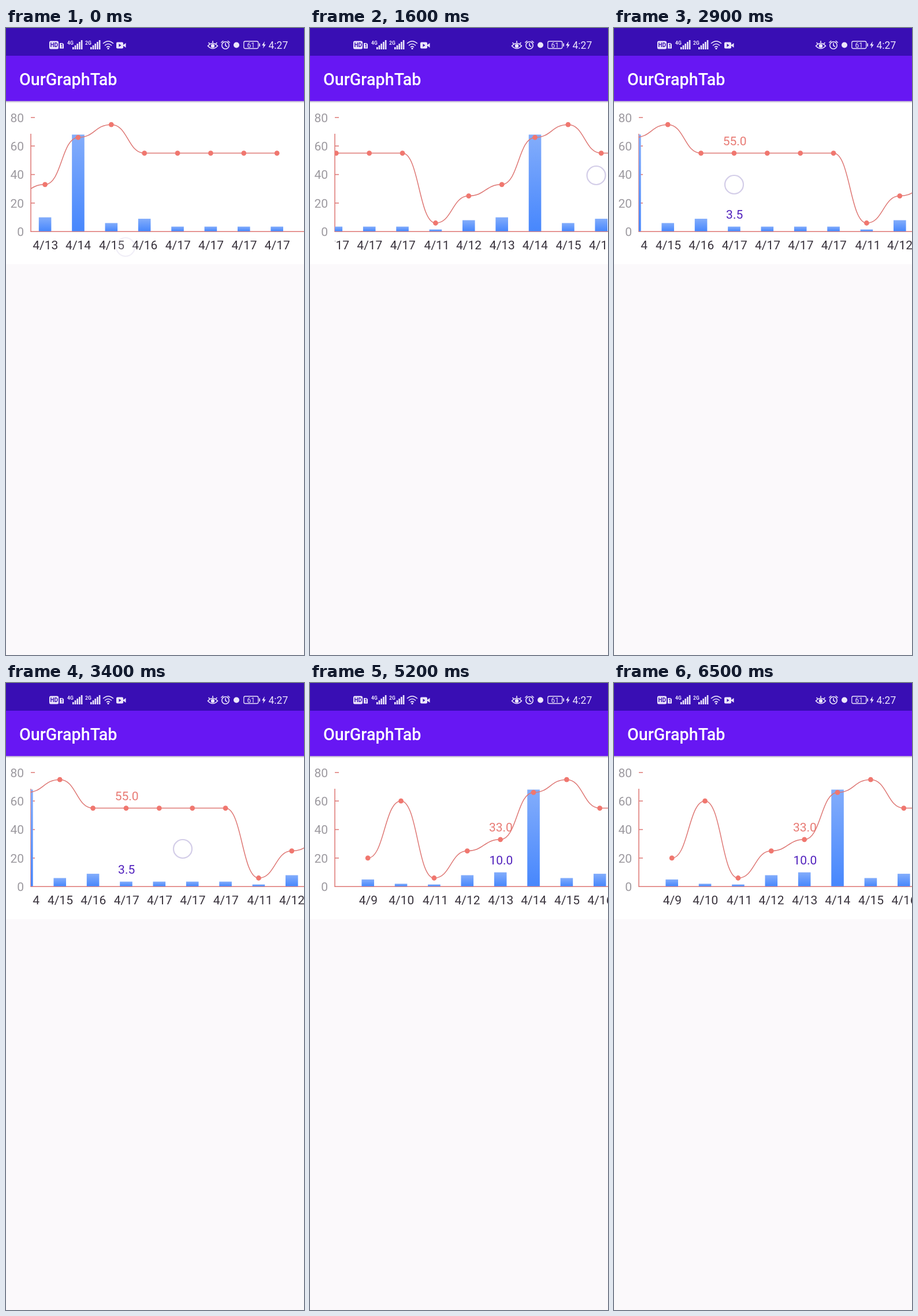
Animation, 516 px wide and 1085 px high, one loop 6700 ms. Source, as an HTML page:

```html
<!DOCTYPE html>
<html lang="en">
<head>
<meta charset="utf-8">
<title>Scrolling chart</title>
<style>
  html, body { margin: 0; width: 100%; height: 100%; overflow: hidden; background: #fbf9fb; }
  svg { display: block; width: 516px; height: 1085px; }
  text { font-family: Roboto, Arial, sans-serif; }
  .num { font-size: 21px; }
  .scale { fill: #9c999f; text-anchor: end; }
  .date { fill: #38323c; }
  .axis, .curve { fill: none; stroke: #de7774; stroke-width: 1.5; }
  .dot { fill: #f0776f; }
  .bar { fill: url(#blue); }
  .lineVal { fill: #e87a74; }
  .barVal { fill: #5121bd; }
  .title { font-size: 28.7px; font-weight: 500; fill: #fff; }
  .ico { fill: #ece6fb; }
  .thin { fill: none; stroke: #ece6fb; stroke-width: 1.6; stroke-linecap: round; }
  .cut { fill: #390eb4; }
  .tiny { font-size: 8.5px; font-weight: 700; }
</style>
</head>
<body>
<svg viewBox="0 0 516 1085" xmlns="http://www.w3.org/2000/svg">
  <defs>
    <linearGradient id="blue" x2="0" y2="1">
      <stop stop-color="#83adfb"/><stop offset="1" stop-color="#4787fd"/>
    </linearGradient>
    <linearGradient id="shade" x2="0" y2="1">
      <stop stop-color="#b8b0c4"/><stop offset="1" stop-color="#fff"/>
    </linearGradient>
    <clipPath id="plot"><rect x="43" y="127" width="473" height="281"/></clipPath>
  </defs>

  <rect y="126" width="516" height="282.5" fill="#fff"/>
  <rect y="126" width="516" height="4" fill="url(#shade)"/>
  <rect width="516" height="48" fill="#390eb4"/>
  <rect y="48" width="516" height="78.4" fill="#6717f3"/>
  <text class="title" x="23" y="98.5">OurGraphTab</text>

  <g class="ico" id="status">
    <rect x="75" y="22.5" width="16" height="14" rx="2.5"/>
    <text class="cut" x="76.4" y="33.3" font-size="10" font-weight="700">HD</text>
    <path d="M93 26h5l2 2v7.5h-7z"/>
    <text class="cut tiny" x="94.2" y="34">1</text>
    <text class="tiny" x="106" y="28.5">4G</text>
    <text class="tiny" x="137" y="28.5">2G</text>
    <path class="thin" d="M168.500 26.500q8.500-7.500 17 0M171.500 30q5.500-5 11 0M174.500 33q2.500-2.300 5 0"/>
    <circle cx="177" cy="35.5" r="1.6"/>
    <rect x="191" y="24.5" width="12" height="11" rx="2"/>
    <path d="M202 30l5.500-4v8z"/>
    <path class="cut" d="M195.500 27.200l4 2.800-4 2.800z"/>

    <path class="thin" d="M349.500 31q8.500-9 17 0-8.500 9-17 0zM351 25.500l1.800 2M358 22.800v2.500M365 25.500l-1.800 2"/>
    <circle cx="358" cy="31" r="3.2"/>
    <circle class="thin" cx="380" cy="30" r="6.2"/>
    <path class="thin" d="M380 26.500v4l2.500 1.500M372.800 25l3-2.500M387.200 25l-3-2.500"/>
    <circle cx="399" cy="29.5" r="5"/>
    <rect class="thin" x="411.8" y="23" width="25" height="12.5" rx="2.5" style="stroke-width:1.3"/>
    <text x="424.3" y="33.6" font-size="12" text-anchor="middle">61</text>
    <rect x="438.3" y="26.5" width="1.7" height="5.5"/>
    <path d="M448 23l-5 7.200h3l-1.200 5.300 5-7h-3z"/>
    <text x="454.5" y="35.8" font-size="17.5">4:27</text>
  </g>

  <g id="scale"><path class="axis" d="M43 183V352.300H516"/></g>
  <g clip-path="url(#plot)"><g id="strip"></g></g>
  <circle id="touch" r="16" fill="#fff" fill-opacity=".5" stroke="#d3cde8" stroke-width="2.2"/>
</svg>
<script>
const LOOP = 6700, STEP = 57.37, BASE = 352.3, UNIT = 2.468;
const FADE = 300, FIRST_X = -735.6;
const $ = id => document.getElementById(id);
const strip = $('strip'), touch = $('touch');
const pen = document.createElement('canvas').getContext('2d');
pen.font = '21px Roboto, Arial, sans-serif';

function add(parent, tag, attrs, text) {
  const el = document.createElementNS('http://www.w3.org/2000/svg', tag);
  for (const k in attrs) el.setAttribute(k, attrs[k]);
  if (text !== undefined) el.textContent = text;
  parent.append(el);
  return el;
}

// Labels start half their inked width left of x.
function label(parent, cls, x, y, text) {
  const m = pen.measureText(text);
  const ink = m.actualBoundingBoxLeft + m.actualBoundingBoxRight;
  add(parent, 'text', { class: 'num ' + cls, x: x + .3 - ink / 2, y }, text);
}

const xOf = i => i * STEP;
const yOf = v => BASE - v * UNIT;

for (const x of [115, 146])
  for (let i = 0; i < 5; i++) {
    const height = 4 + 3 * i;
    add($('status'), 'rect', { x: x + 3.7 * i, y: 37 - height, width: 2.6, height });
  }

for (let v = 0; v <= 80; v += 20) {
  add($('scale'), 'text', { class: 'num scale', x: 31, y: yOf(v) + 7.7 }, v);
  if (v) add($('scale'), 'path', { class: 'axis', d: `M43 ${yOf(v)}h7` });
}

const point = (day, bar, val) => ({ day, bar, val });
const week = [point(11, 1.5, 6), point(12, 8, 25), point(13, 10, 33), point(14, 68, 66),
  point(15, 6, 75), point(16, 9, 55), ...Array(4).fill(point(17, 3.5, 55))];
const data = [point(9, 5, 20), point(10, 2, 60), ...week, ...week];

let curve = '';
data.forEach(({ day, bar, val }, i) => {
  const x = xOf(i), y = yOf(val), mid = x - STEP / 2;
  add(strip, 'rect', { class: 'bar', x: x - 10.8, y: yOf(bar), width: 21.6, height: bar * UNIT - .5 });
  label(strip, 'date', x, 383, '4/' + day);
  curve += i ? `C${mid} ${yOf(data[i - 1].val)} ${mid} ${y} ${x} ${y}` : `M${x} ${y}`;
});
add(strip, 'path', { class: 'curve', d: curve });
data.forEach((p, i) => add(strip, 'circle', { class: 'dot', cx: xOf(i), cy: yOf(p.val), r: 4.4 }));

function values(i) {
  const g = add(strip, 'g', {}), { bar, val } = data[i];
  label(g, 'lineVal', xOf(i), yOf(val) - 13.5, val.toFixed(1));
  label(g, 'barVal', xOf(i), yOf(bar) - 13.5, bar.toFixed(1));
  return g;
}

// A drag moves the strip as far as the finger; a tap shows the values of one day.
const drag = (t, len, x, y, shift) => ({ t, len, x, y, shift });
const tap = (t, x, y, day) => ({ t, len: 0, x, y, shift: 0, pick: day && values(day) });
const moves = [
  tap(-200, 207, 379),
  drag(1200, 415, 231, 255, 265.6),
  drag(1900, 325, 286, 271, 219),
  tap(2900, 208, 271, 8),
  drag(3400, 400, 306, 287, 241.6),
  tap(4200, 225, 271, 4),
  drag(4600, 300, 300, 279, 109.6)
];

const clamp = p => Math.min(1, Math.max(0, p));
const ease = p => p * p * (3 - 2 * p);
const moved = (m, t) => m.shift * ease(clamp((t - m.t) / (m.len || 1)));

const start = performance.now();
function draw() {
  const time = Math.max(0, performance.now() - start) % LOOP;
  const t = Math.floor(time / 100) * 100;

  const x = moves.reduce((sum, m) => sum + moved(m, t), FIRST_X);
  strip.setAttribute('transform', `translate(${x})`);

  const past = moves.filter(m => m.t <= t), last = past[past.length - 1];
  touch.setAttribute('transform', `translate(${last.x + moved(last, t)} ${last.y})`);
  touch.setAttribute('opacity', 1 - clamp((t - last.t - last.len) / FADE));

  const picked = past.filter(m => m.pick).pop();
  for (const m of moves)
    if (m.pick) m.pick.setAttribute('visibility', m === picked ? 'visible' : 'hidden');
  requestAnimationFrame(draw);
}
draw();
</script>
</body>
</html>
```
